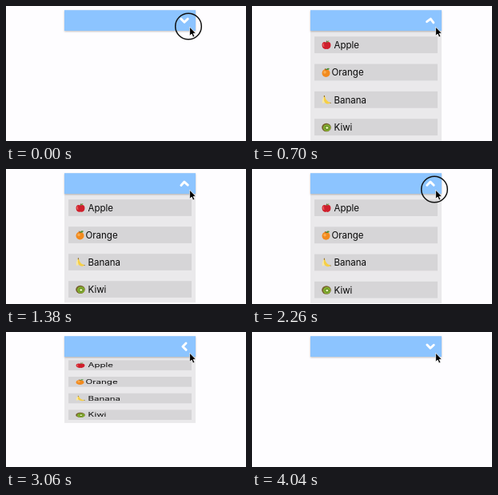
These frames come from a looping animation (300 by 169 pixels, 4360 ms). An HTML page:

```html
<!DOCTYPE html>
<html lang="en">
<head>
<meta charset="utf-8">
<title>Spring dropdown</title>
<style>
  html, body { margin: 0; width: 100%; height: 100%; overflow: hidden; background: #fefdff; }
  svg { display: block; width: 100%; height: 100%; }
  text { font: 11.5px Inter, "Liberation Sans", sans-serif; fill: #080808; }
  .header { fill: #8cc4ff; filter: drop-shadow(0 1px 1px rgba(0, 0, 0, .25)); }
</style>
</head>
<body>
<svg viewBox="0 0 300 169">
  <g id="panel">
    <rect x="73" y="31" width="164" height="137" fill="#eae9eb"/>
    <g fill="#d6d5d7">
      <rect x="78" y="38.2" width="154" height="20.8"/>
      <rect x="78" y="72.4" width="154" height="20.8"/>
      <rect x="78" y="106.6" width="154" height="20.8"/>
      <rect x="78" y="140.8" width="154" height="20.8"/>
    </g>
    <text x="102.5" y="53">Apple</text>
    <text x="99.5" y="87.3">Orange</text>
    <text x="102.5" y="121.5">Banana</text>
    <text x="102.5" y="155.6">Kiwi</text>

    <g transform="translate(93 48.8)">
      <path d="M0-3C-3-5-6-3-5.4 1C-5 4-2.5 6 0 4.8C2.5 6 5 4 5.4 1C6-3 3-5 0-3Z" fill="#cf1f2c"/>
      <path d="M-3.5-2Q-4.5 0-3 2" fill="none" stroke="#ee6a62" stroke-width="1.3"/>
      <path d="M0-2.5L.5-5.2" stroke="#6b3b1c"/>
      <path d="M.5-3.5Q1-5.8 3.5-5.3Q3-3.5.5-3.5Z" fill="#5a9c35"/>
    </g>
    <g transform="translate(92.5 83)">
      <circle cy=".8" r="5" fill="#f28a1e"/>
      <circle cx="-1.5" cy="-.3" r="1.8" fill="#f9ad50"/>
      <path d="M0-3.3Q1-6.3 4.5-5Q3.5-2.5 0-3.3Z" fill="#4f8f36"/>
      <path d="M0-3L-1-5" stroke="#6b4a22"/>
    </g>
    <g transform="translate(93 117.3)">
      <path d="M-2-5Q-1 2 5.5 3.4Q3 6-1 4Q-4.5 1.5-3.2-5Z" fill="#f6cf45"/>
      <path d="M-3-4Q-6-1-5 4Q-3.5 4.5-2.5 3Q-3.8 0-3-4Z" fill="#f7e7a4"/>
      <path d="M-2.6-3.6V-5.6M4.6 3.6L5.6 3.8" stroke="#86652a"/>
    </g>
    <g transform="translate(93 151.5)">
      <ellipse rx="5.8" ry="5.2" fill="#76602f"/>
      <ellipse cx=".6" cy=".5" rx="4.6" ry="4.2" fill="#86b52f"/>
      <ellipse cx=".8" cy=".6" rx="2.5" ry="2.2" fill="none" stroke="#34461b" stroke-dasharray=".9 1"/>
      <ellipse cx=".8" cy=".6" rx="1.5" ry="1.2" fill="#e7edb8"/>
    </g>
  </g>

  <rect class="header" x="73" y="5.2" width="164" height="25.8"/>
  <path id="chevron" d="M-4.2-2.1L0 2.1L4.2-2.1" fill="none" stroke="#fff" stroke-width="2.9" stroke-linecap="round" stroke-linejoin="round"/>
  <circle id="press" cx="228" cy="25.5" r="16.3" fill="none" stroke="#111" stroke-width="1.5"/>
  <path d="M229.6 26.2V37.3L232.1 35L233.8 38.9L235.8 38L234.1 34.3H237.4Z" fill="#000" stroke="#fff" stroke-width=".7"/>
</svg>
<script>
const LOOP = 4360, OPEN_AT = 420, CLOSE_AT = 2940;
const panel = document.getElementById('panel');
const chevron = document.getElementById('chevron');
const press = document.getElementById('press');

// Spring time in seconds: 60 Hz steps, held for 20, 100 and 20 ms in turn.
function springTime(elapsed) {
  const rest = elapsed % 140;
  const step = 3 * Math.floor(elapsed / 140) + 1 + (rest >= 20) + (rest >= 120);
  return step / 60 + 0.01;
}

// Remaining distance, from 1 to 0, of a spring with unit mass.
function spring(t, stiffness, damping) {
  const decay = damping / 2;
  const freq = Math.sqrt(stiffness - decay * decay);
  return Math.exp(-decay * t) * (Math.cos(freq * t) + decay / freq * Math.sin(freq * t));
}

function criticalSpring(t, freq) {
  return (1 + freq * t) * Math.exp(-freq * t);
}

function pose(now) {
  if (now < OPEN_AT) return { scale: 0, turn: 0 };
  if (now < CLOSE_AT) {
    const t = springTime(now - OPEN_AT);
    return { scale: 1 - spring(t, 550, 30), turn: 1 - spring(t, 500, 25) };
  }
  const t = springTime(now - CLOSE_AT);
  return { scale: criticalSpring(t - 0.008, 26.2), turn: spring(t, 500, 25) };
}

function draw() {
  const now = performance.now() % LOOP;
  const { scale, turn } = pose(now);
  panel.setAttribute('visibility', scale > 0.002 ? 'visible' : 'hidden');
  panel.setAttribute('transform', `translate(0 31) scale(1 ${scale}) translate(0 -31)`);
  chevron.setAttribute('transform', `translate(223 18.2) rotate(${180 * turn})`);
  const pressed = now < 280 || (now >= 2260 && now < 2800);
  press.setAttribute('visibility', pressed ? 'visible' : 'hidden');
  requestAnimationFrame(draw);
}
draw();
</script>
</body>
</html>
```
